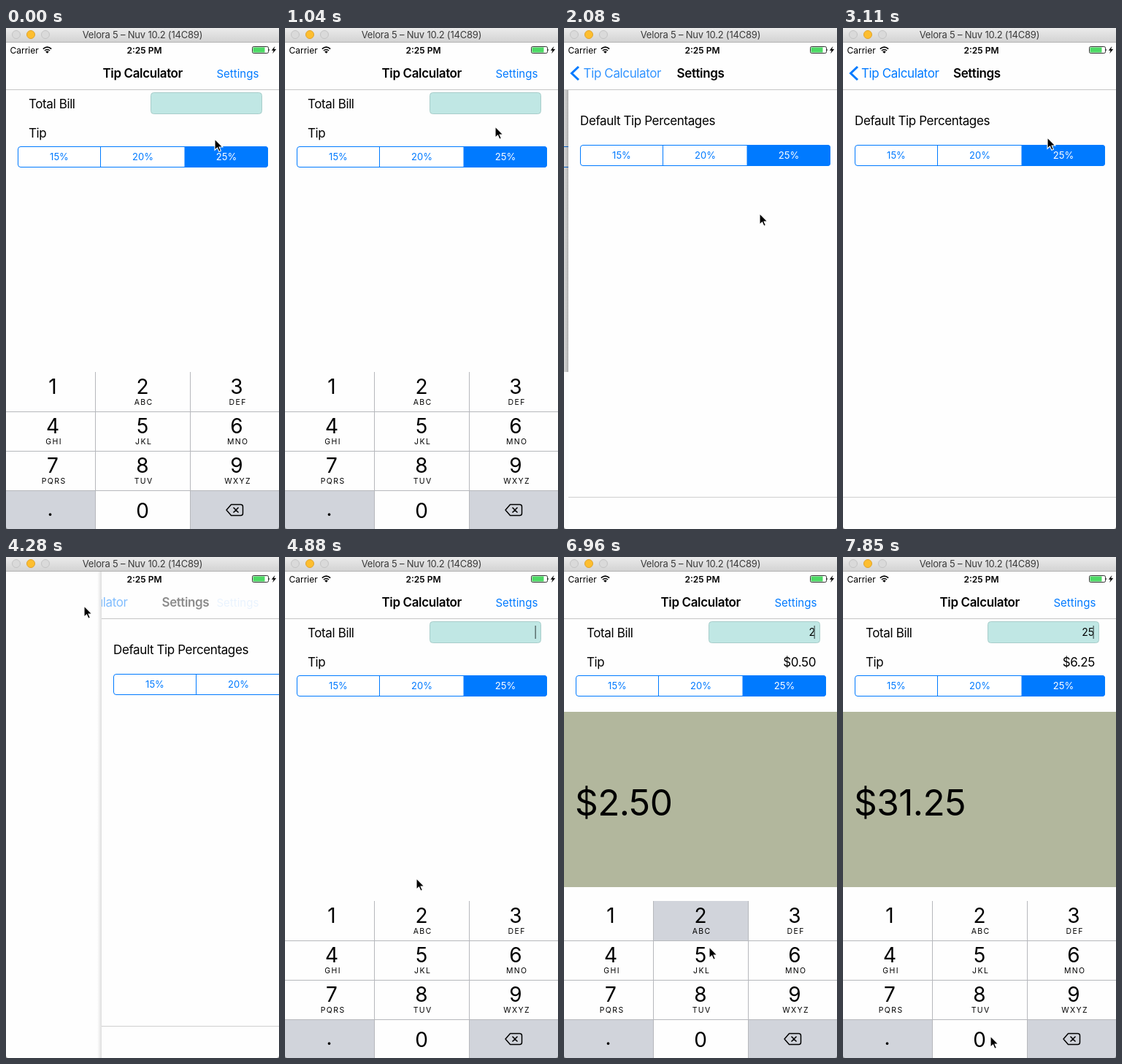
Recreate the animation shown at these times as an HTML page. Size 374 by 686 pixels, loop 7990 ms.

```html
<!DOCTYPE html>
<html lang="en">
<head>
<meta charset="utf-8">
<title>Tip Calculator</title>
<style>
  html, body { margin: 0; width: 100%; height: 100%; overflow: hidden; background: #fff; }
  svg { display: block; width: 374px; height: 686px; }
  text { font: 17px Inter, "Open Sans", sans-serif; letter-spacing: -.38px; white-space: pre; }
  .bold { font-weight: 600; }
  .mid { text-anchor: middle; }
  .end { text-anchor: end; }
  .blue { fill: #007aff; }
  .window { font-size: 13px; letter-spacing: -.2px; fill: #3a3a3a; }
  .status { font-size: 12px; letter-spacing: 0; }
  .button { font-size: 15px; letter-spacing: 0; }
  .seg { font-size: 13px; letter-spacing: 0; }
  .entry { font-size: 14px; letter-spacing: 0; }
  .total { font-size: 49.5px; letter-spacing: -.55px; }
  .digit { font-size: 28px; letter-spacing: 0; }
  .letters { font-size: 10.5px; letter-spacing: 1.4px; }
</style>
</head>
<body>
<svg viewBox="0 0 374 686">
  <defs>
    <linearGradient id="chrome" x2="0" y2="1">
      <stop stop-color="#ebebeb"/><stop offset="1" stop-color="#d2d2d2"/>
    </linearGradient>
    <linearGradient id="shade">
      <stop stop-color="#000" stop-opacity="0"/><stop offset="1" stop-color="#000" stop-opacity=".22"/>
    </linearGradient>
    <linearGradient id="edgeShade">
      <stop stop-color="#fff"/><stop offset="1" stop-color="#dedede"/>
    </linearGradient>
  </defs>
  <rect width="374" height="686" fill="#fefefe"/>

  <g id="bill">
    <text x="31" y="109.7">Total Bill</text>
    <rect x="198.5" y="88.5" width="152" height="29" rx="4" fill="#c0e7e4" stroke="#a8cdca"/>
    <text id="entry" class="entry end" x="344" y="108"></text>
    <rect id="caret" x="342.5" y="94" width="1.3" height="18" fill="#4d5e5d"/>
    <text x="31" y="149.7">Tip</text>
    <text id="tip" class="end" x="345" y="149.7"></text>
    <g id="billSegs"></g>
    <g id="result">
      <rect y="212" width="374" height="240" fill="#b2b79d"/>
      <text id="total" class="total" x="15" y="353.5"></text>
    </g>
  </g>
  <g id="keys"></g>

  <g id="dim">
    <rect id="dimFill" y="85" height="386"/>
    <rect id="dimEdge" y="85" width="7" height="386" fill="url(#shade)"/>
    <rect id="dimFoot" y="471" height="215" fill="#fcfcfc"/>
  </g>
  <g id="prefs">
    <rect y="85" width="374" height="601" fill="#fefefe"/>
    <text x="16" y="133">Default Tip Percentages</text>
    <g id="prefSegs"></g>
    <path d="M0 642.5H374" stroke="#cfcfcf"/>
  </g>

  <g id="nav">
    <rect y="20" width="374" height="65" fill="#fefefe"/>
    <path d="M0 84.5H374" stroke="#c6c6c6"/>
    <path id="chevron" d="M20 53L10.5 62L20 71" fill="none" stroke="#007aff" stroke-width="3"/>
    <text id="back" class="blue" y="68.2">Tip Calculator</text>
    <text id="billTitle" class="bold" y="68.2">Tip Calculator</text>
    <text id="prefTitle" class="bold" y="68.2">Settings</text>
    <text id="button" class="blue button" x="288.5" y="67.6">Settings</text>
    <text class="status" x="5.5" y="34.5">Carrier</text>
    <g fill="none" stroke="#000" stroke-width="1.6">
      <path d="M50.8 28.6Q56.5 23.8 62.2 28.6M52.9 31Q56.5 28 60.1 31"/>
    </g>
    <path d="M54.2 32.4Q56.5 30.8 58.8 32.4L56.5 34.8z"/>
    <text class="status bold mid" x="189.5" y="34.5">2:25 PM</text>
    <rect x="337.5" y="25.5" width="22" height="9" rx="1.8" fill="#fff" stroke="#333"/>
    <rect x="338.5" y="26.5" width="16" height="7" fill="#4cd964"/>
    <path d="M360.5 28.2Q362.3 30 360.5 31.8z"/>
    <path d="M368.4 25L363.8 30.8H366.6L365.2 35L370.2 29H367.2z"/>
  </g>

  <g id="cover">
    <rect id="coverFill" y="20" height="666" fill="#fefefe"/>
    <rect id="coverEdge" y="20" width="6" height="666" fill="url(#edgeShade)"/>
  </g>

  <rect width="374" height="20" fill="url(#chrome)"/>
  <path d="M0 19.5H374" stroke="#b4b4b4"/>
  <g fill="#dadada" stroke="#c4c4c4">
    <circle cx="14" cy="9" r="5.5"/><circle cx="54" cy="9" r="5.5"/>
    <circle cx="34" cy="9" r="5.5" fill="#fdbe2f" stroke="#e0a32c"/>
  </g>
  <text class="window mid" x="187" y="14.2">Velora 5 – Nuv 10.2 (14C89)</text>
  <path d="M0 682.5Q0 686 3.5 686H0zM374 682.5Q374 686 370.5 686H374z" fill="#8a8a8a"/>
  <path id="cursor" d="M0 0V15.2L3.5 12L5.9 17.3L8.4 16.2L6.1 11H10.9z" stroke="#fff" stroke-width="1.1"/>
</svg>
<script>
const LOOP = 7990, STEPS = 54, TICK = 148, W = 374;
const PUSH = 1759.7, POP = 4228.4, BACK = 33, TYPE_2 = 46, TYPE_5 = 49;

// step, x, y of the pointer tip
const PATH = [
  [0, 286, 152], [1, 286, 152], [3, 225, 215], [5, 196, 230], [6, 230, 190], [8, 345, 80],
  [10, 321, 72], [12, 321, 72], [13, 300, 160], [14, 268, 254], [16, 266, 212], [17, 230, 190],
  [19, 197, 175], [21, 280, 150], [23, 336, 139], [24, 300, 138], [25, 230, 110], [27, 110, 68],
  [29, 107, 67], [31, 107, 67], [33, 180, 440], [34, 180, 440], [35, 176, 470], [38, 190, 530],
  [40, 195, 536], [41, 196, 520], [42, 198, 495], [45, 199, 494], [46, 200, 490], [47, 199, 534],
  [50, 200, 540], [52, 202, 635], [53, 202, 656]
];

const el = {};
const set = (n, name, v) => n.setAttribute(name, v);
const show = (n, on) => set(n, 'visibility', on ? 'visible' : 'hidden');
const fade = (n, v) => set(n, 'opacity', Math.max(0, Math.min(1, v)));
const move = (n, x, y = 0) => set(n, 'transform', `translate(${x} ${y})`);

function segments(top) {
  const label = (x, s, color) =>
    `<text class="seg mid" x="${x}" y="${top + 18.9}" fill="${color}">${s}</text>`;
  return `<rect x="16.5" y="${top + .5}" width="342" height="28" rx="3.5" fill="#fff" stroke="#007aff"/>
    <path d="M244.5 ${top}H355Q359 ${top} 359 ${top + 4}V${top + 25}Q359 ${top + 29} 355 ${top + 29}H244.5z" fill="#007aff"/>
    <path d="M129.5 ${top}v29" stroke="#007aff"/>` +
    label(73, '15%', '#007aff') + label(187.5, '20%', '#007aff') + label(302, '25%', '#fff');
}

function keypad() {
  const names = ['', 'ABC', 'DEF', 'GHI', 'JKL', 'MNO', 'PQRS', 'TUV', 'WXYZ'];
  const centers = [64, 187, 316];
  let s = `<rect y="471" width="374" height="215" fill="#fefefe"/>
    <path d="M0 633H122V686H0zM253 633H374V686H253z" fill="#d1d4db"/>
    <rect id="hit" x="123" width="129" height="54" fill="#d1d4db"/>
    <path d="M0 525.5H374M0 579.5H374M0 633.5H374M122.5 471V686M252.5 471V686" stroke="#b6b8bc"/>`;
  names.forEach((name, i) => {
    const x = centers[i % 3], y = 501 + 54 * Math.floor(i / 3);
    s += `<text class="digit mid" x="${x}" y="${y}">${i + 1}</text>
      <text class="letters mid" x="${x + 1.7}" y="${y + 15}">${name}</text>`;
  });
  return s + `<text class="digit mid" x="187" y="670.5">0</text>
    <text class="digit mid" x="60.5" y="668">.</text>
    <path d="M308.5 652.5H321.5Q324.5 652.5 324.5 655.5V664.5Q324.5 667.5 321.5 667.5H308.5L302 660z
      M311.5 656.5l7 7m0-7l-7 7" fill="none" stroke="#000" stroke-width="1.5" stroke-linejoin="round"/>`;
}

// critically damped spring, 0 to 1
function spring(ms) {
  const z = Math.max(0, ms) * .01947;
  return 1 - (1 + z) * Math.exp(-z);
}

function pointer(step) {
  const i = Math.max(1, PATH.findIndex(p => p[0] >= step));
  const [a, ax, ay] = PATH[i - 1], [b, bx, by] = PATH[i];
  const k = (step - a) / (b - a);
  return [Math.round(ax + (bx - ax) * k), Math.round(ay + (by - ay) * k)];
}

function drawScreens(step, t) {
  const home = t < PUSH || step >= BACK, popping = t >= POP && !home;
  const inMs = t - PUSH, outMs = t - POP;
  const p = home ? 0 : popping ? 1 - spring(outMs) : spring(inMs);
  const edge = Math.round(W * (1 - p));

  move(el.bill, Math.round(-112 * p));
  show(el.keys, home);
  show(el.prefs, !home);
  move(el.prefs, edge);
  show(el.dim, !home && !popping);
  set(el.dimFill, 'width', edge);
  set(el.dimFill, 'opacity', .12 * p);
  set(el.dimEdge, 'x', edge - 7);
  set(el.dimFoot, 'width', edge);

  show(el.cover, popping);
  set(el.coverFill, 'width', edge);
  set(el.coverEdge, 'x', edge - 6);

  set(el.billTitle, 'x', 132.5 - 106 * p);
  set(el.back, 'x', 125 - 100 * p);
  set(el.prefTitle, 'x', 151 + (popping ? 178 : 222) * (1 - p));
  fade(el.billTitle, home ? 1 : popping ? 0 : 1 - inMs / 115);
  fade(el.back, home ? 0 : popping ? 1 - outMs / 125 : inMs / 390);
  fade(el.chevron, home ? 0 : popping ? 1 - outMs / 125 : inMs / 300);
  fade(el.prefTitle, home ? 0 : popping ? 1 - outMs / 115 : inMs / 290);
  const pressed = step === 11;
  fade(el.button, home ? (pressed ? .2 : 1) : popping ? outMs / 800 : .2 - (inMs - 16) / 500);
}

function drawEntry(step, t) {
  const typed = step >= TYPE_5 ? 25 : step >= TYPE_2 ? 2 : 0;
  const money = v => typed ? '$' + v.toFixed(2) : '';
  el.entry.textContent = typed || '';
  el.tip.textContent = money(typed * .25);
  el.total.textContent = money(typed * 1.25);
  show(el.result, typed);
  const focused = t < PUSH || step >= BACK;
  show(el.caret, focused && (typed || t % 1000 >= 500));
  const hit2 = step === TYPE_2 || step === TYPE_2 + 1;
  const hit5 = step === TYPE_5 || step === TYPE_5 + 1;
  show(el.hit, hit2 || hit5);
  set(el.hit, 'y', hit5 ? 525 : 471);
}

function draw(ms) {
  const step = Math.min(STEPS - 1, Math.floor((ms % LOOP + 15) * STEPS / LOOP));
  const t = step * TICK;
  drawScreens(step, t);
  drawEntry(step, t);
  move(el.cursor, ...pointer(step));
}

const find = id => document.getElementById(id);
find('billSegs').innerHTML = segments(162);
find('prefSegs').innerHTML = segments(160);
find('keys').innerHTML = keypad();
document.querySelectorAll('svg [id]').forEach(n => el[n.id] = n);

let start;
function frame(now) {
  start ??= now;
  draw(now - start);
  requestAnimationFrame(frame);
}
draw(0);
requestAnimationFrame(frame);
</script>
</body>
</html>
```
